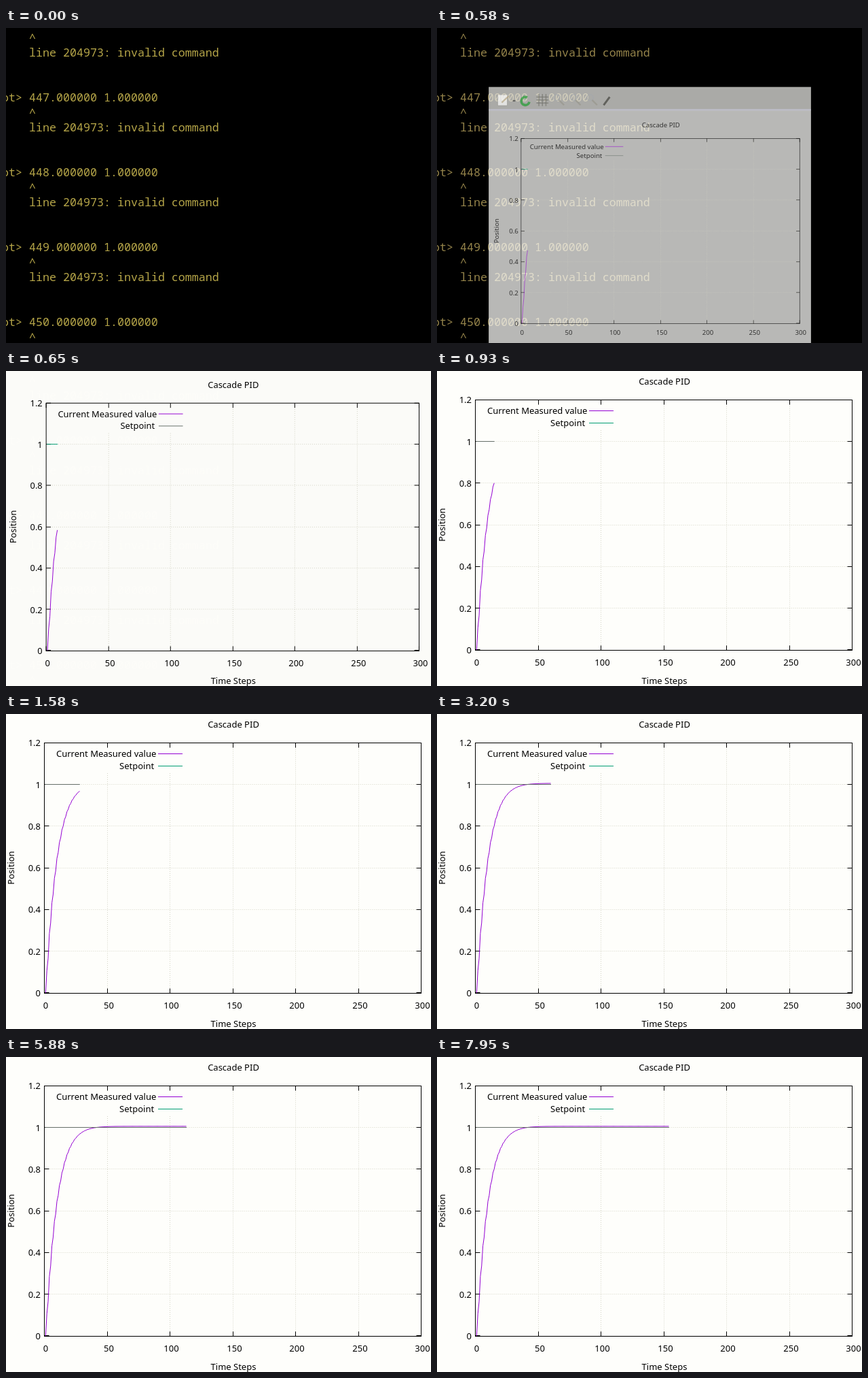
An HTML page with a canvas for the animation above (8000 ms loop, 626 px wide and 463 px high).

```html
<!DOCTYPE html>
<html lang="en">
<head>
<meta charset="utf-8">
<title>Step response</title>
<style>
html, body { margin: 0; width: 100%; height: 100%; overflow: hidden; background: #000; }
canvas { display: block; }
</style>
</head>
<body>
<canvas id="stage" width="626" height="463"></canvas>
<script>
const ctx = document.getElementById('stage').getContext('2d');
const LOOP = 8000;
const PURPLE = '#9400d3', GREEN = '#009e73', DULL = '#66706a', GRID = '#d4d4c6';
const LEFT = 56.5, RIGHT = 611.5, TOP = 42.5, BOTTOM = 410.5;
const OPEN_AT = 552, OPEN_MS = 150;

// Bursts of evenly spaced updates: first time, last time, count
const bursts = [
  [580, 610, 2], [650, 1380, 17], [1430, 2190, 16], [2240, 3030, 17],
  [3100, 3900, 17], [3950, 4730, 16], [4760, 5520, 16], [5570, 6330, 16],
  [6380, 7130, 16], [7190, 7950, 16]
];

const px = v => LEFT + v * 1.85;
const py = v => 409.9 - v * 306.25;
const crisp = v => Math.floor(v) + 0.5;

// Number of updates so far and the time of the latest one
function progress(t) {
  let steps = 0, last = 0;
  for (const [a, b, n] of bursts) {
    if (t < a) break;
    const gap = (b - a) / (n - 1);
    const i = Math.min(n - 1, Math.floor((t - a + 5) / gap));
    steps += i + 1;
    last = a + i * gap;
  }
  return { steps, last };
}

// Damped rise with a small alternating lag
function response(n) {
  const rise = 1.006 * (1 - Math.exp(-(0.1095 + 0.00045 * n) * (n - 1)));
  return rise - (n > 1 && n % 2 ? 0.05 * Math.exp(-n / 8) : 0);
}

function line(color, width, ...pts) {
  ctx.strokeStyle = color;
  ctx.lineWidth = width;
  ctx.beginPath();
  for (let i = 0; i < pts.length; i += 2) ctx.lineTo(pts[i], pts[i + 1]);
  ctx.stroke();
}

function arc(color, width, x, y, r, from, to) {
  ctx.strokeStyle = color;
  ctx.lineWidth = width;
  ctx.beginPath();
  ctx.arc(x, y, r, from, to);
  ctx.stroke();
}

function text(str, x, y, align = 'left') {
  ctx.textAlign = align;
  ctx.fillText(str, x, y);
}

function drawTerminal(t) {
  ctx.fillStyle = '#000';
  ctx.fillRect(0, 0, 626, 463);
  ctx.font = '16.67px "Noto Sans Mono", monospace';
  ctx.fillStyle = t < 270 ? '#b5a548' : '#94834a';
  for (let i = 0; i < 5; i++) {
    const y = 110 * i;
    if (i) text('ot> ' + (446 + i) + '.000000 1.000000', -6, y - 2);
    text('^', 34, y + 20);
    text('line 204973: invalid command', 34, y + 42);
  }
}

function drawToolbar() {
  ctx.fillStyle = '#ebeae6';
  ctx.fillRect(-8, -60, 642, 46);
  ctx.fillStyle = '#cacada';
  ctx.fillRect(-8, -16, 642, 3);

  ctx.fillStyle = '#fafaf8';
  ctx.fillRect(10, -44, 19, 21);
  line('#9a9a94', 1.2, 10, -44, 10, -23, 29, -23, 29, -40);
  line('#b5a585', 3, 18, -29, 32, -42);

  ctx.fillStyle = '#4a4a46';
  ctx.fillRect(40, -34, 5, 3);

  arc('#249c35', 5, 65, -32, 8, 0.2, 5.2);

  for (let i = 0; i < 3; i++) {
    line('#777770', 2, 92 + i * 7, -46, 92 + i * 7, -22);
    line('#777770', 2, 87, -40 + i * 6, 111, -40 + i * 6);
  }
  for (let i = 0; i < 3; i++) {
    const x = 128 + i * 33;
    arc('#a4a8ac', 2, x, -39, 6, 0, 7);
    line('#98968c', 3, x + 4, -34, x + 14, -24);
  }
  line('#45453f', 4, 221, -24, 233, -40);
}

function drawAxes(moving) {
  ctx.setLineDash([1, 2]);
  for (let v = 50; v < 300; v += 50) {
    const x = crisp(px(v));
    line(GRID, 1, x, v < 150 ? 87 : TOP, x, BOTTOM);
  }
  for (let i = 1; i < 6; i++) {
    const y = crisp(py(i / 5));
    line(GRID, 1, LEFT, y, RIGHT, y);
  }
  ctx.setLineDash([]);

  ctx.font = '13px "Noto Sans", sans-serif';
  ctx.fillStyle = '#000';
  for (let v = 0; v <= 300; v += 50) {
    const x = crisp(px(v));
    line('#000', 1, x, BOTTOM, x, BOTTOM - 7);
    line('#000', 1, x, TOP, x, TOP + 7);
    text(String(v), x + 2, 433, 'center');
  }
  for (let i = 0; i <= 6; i++) {
    const y = crisp(py(i / 5));
    line('#000', 1, LEFT, y, LEFT + 7, y);
    line('#000', 1, RIGHT, y, RIGHT - 7, y);
    text(String(i / 5), 51, Math.round(py(i / 5) + 5), 'right');
  }
  ctx.strokeRect(LEFT, TOP, RIGHT - LEFT, BOTTOM - TOP);

  text('Cascade PID', 335, 20, 'center');
  text('Time Steps', 335, 460, 'center');
  ctx.save();
  ctx.translate(12, 226);
  ctx.rotate(-Math.PI / 2);
  text('Position', 0, 0, 'center');
  ctx.restore();

  text('Current Measured value', 74, 63);
  text('Setpoint', 167, 81);
  line(PURPLE, 1, 224, 58.5, 260, 58.5);
  line(moving ? DULL : GREEN, 1, 224, 76.5, 260, 76.5);
}

function drawData(n, moving) {
  const pts = [];
  for (let i = 1; i <= n; i++) pts.push(px(i), py(response(i)));
  line(PURPLE, 1, ...pts);
  line(moving ? GREEN : DULL, 1, LEFT + 1, 103.5, px(n) + 0.5, 103.5);
}

// The window grows from its bottom centre with an exponential ease-out
function drawWindow({ steps, last }) {
  const p = (last - OPEN_AT) / OPEN_MS;
  const ease = p < 1 ? 1 - 2 ** (-10 * p) : 1;
  const scale = 0.05 + 0.95 * ease;
  const moving = ease < 1;
  const n = steps + 6 - (steps >= 19 ? 1 : 0);
  ctx.save();
  ctx.globalAlpha = ease;
  ctx.translate(315 * (1 - scale), 503 * (1 - scale));
  ctx.scale(scale, scale);
  ctx.fillStyle = '#fefefb';
  ctx.fillRect(-8, -14, 642, 517);
  if (moving) drawToolbar();
  drawAxes(moving);
  drawData(n, moving);
  ctx.restore();
}

function render(now) {
  const t = now % LOOP;
  const state = progress(t);
  drawTerminal(t);
  if (state.steps) drawWindow(state);
}

let start;
function tick(now) {
  if (start === undefined) start = now;
  render(now - start);
  requestAnimationFrame(tick);
}
render(0);
requestAnimationFrame(tick);
</script>
</body>
</html>
```
